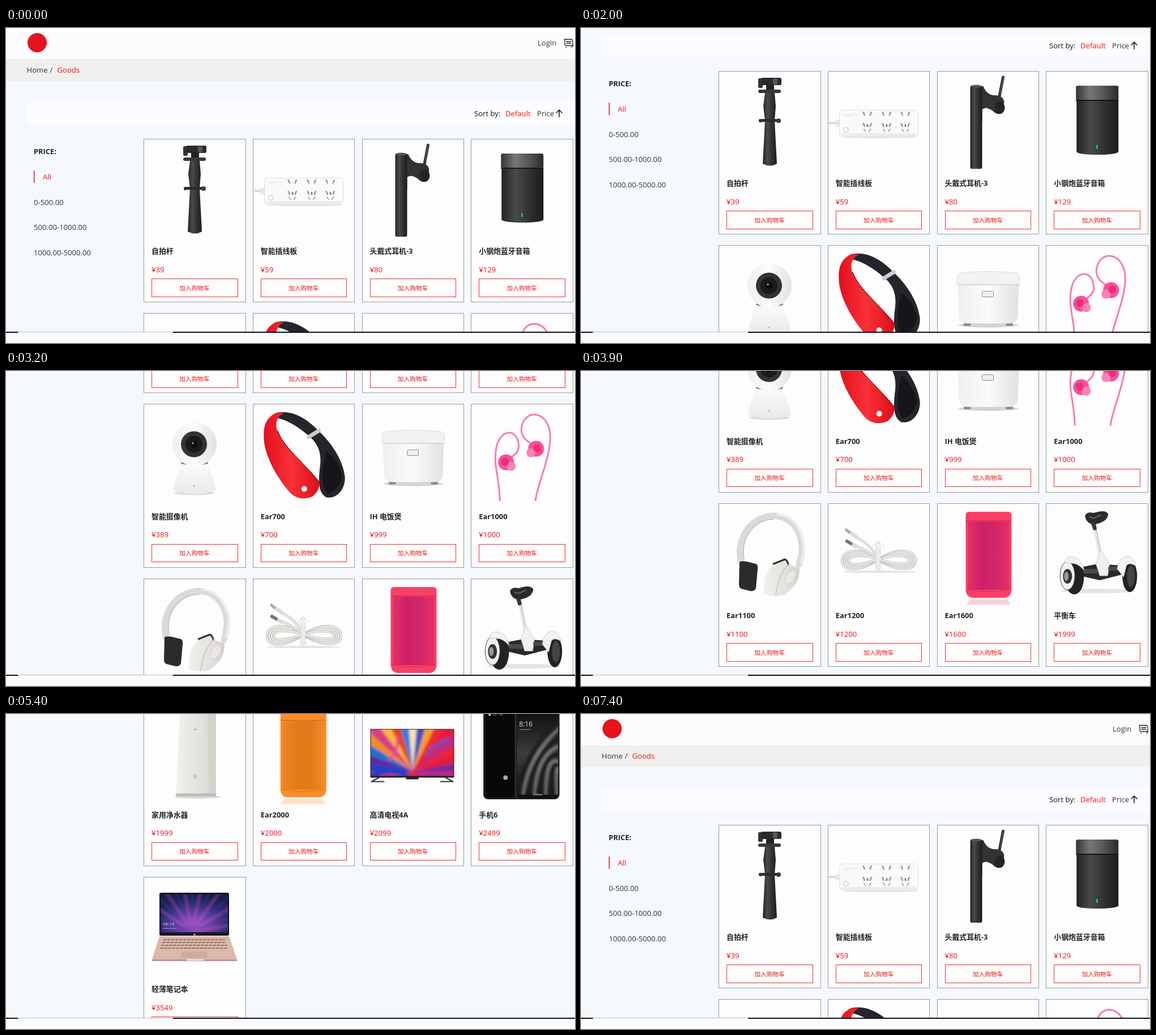
Write an HTML page that moves like this. It is 1005 by 557 pixels and loops after 8000 ms.

```html
<!DOCTYPE html>
<html lang="zh-CN">
<head>
<meta charset="utf-8">
<title>Goods</title>
<style>
html, body { margin: 0; width: 100%; height: 100%; overflow: hidden; background: #fafbfd; }
svg { display: block; width: 100vw; height: 100vh; }
text { font: 13.1px 'Open Sans', 'Noto Sans CJK SC', 'Noto Sans CJK', sans-serif; fill: #333; white-space: pre; }
.bold { font-weight: 700; font-size: 12.9px; fill: #222; }
.red { fill: #ee1414; }
.buy { font-size: 10.7px; fill: #ee1414; text-anchor: middle; }
.box { shape-rendering: crispEdges; }
</style>
</head>
<body>
<svg viewBox="0 0 1005 557" preserveAspectRatio="none">
  <defs id="defs"></defs>
  <rect width="1005" height="538" fill="#f5f9fe"/>
  <g id="page"></g>
  <rect y="537" width="1005" height="20" fill="#fafbfd"/>
  <rect y="537" width="1005" height="2" fill="#111"/>
  <rect x="21" y="537" width="274" height="2" fill="#fafbfd"/>
  <rect x="21" y="537" width="274" height="1" fill="#bbb"/>
</svg>
<script>
const rect = (x, y, w, h, fill, extra = '') =>
  `<rect x="${x}" y="${y}" width="${w}" height="${h}" fill="${fill}" ${extra}/>`;
const oval = (x, y, rx, ry, fill, extra = '') =>
  `<ellipse cx="${x}" cy="${y}" rx="${rx}" ry="${ry}" fill="${fill}" ${extra}/>`;
const disc = (x, y, r, fill, extra) => oval(x, y, r, r, fill, extra);
const shape = (d, fill, extra = '') => `<path d="${d}" fill="${fill}" ${extra}/>`;
const line = (d, color, width = 1, extra = '') =>
  `<path d="${d}" fill="none" stroke="${color}" stroke-width="${width}" stroke-linecap="round" stroke-linejoin="round" ${extra}/>`;
const text = (x, y, s, cls = '', extra = '') => `<text x="${x}" y="${y}" class="${cls}" ${extra}>${s}</text>`;
const stops = colors => colors.map((c, i) => `<stop offset="${i / (colors.length - 1)}" stop-color="${c}"/>`).join('');
const gradient = (id, colors, vertical) =>
  `<linearGradient id="${id}" x2="${vertical ? 0 : 1}" y2="${vertical ? 1 : 0}">${stops(colors)}</linearGradient>`;
const clip = (id, ...box) => `<clipPath id="${id}">${rect(...box)}</clipPath>`;

document.getElementById('defs').innerHTML =
  gradient('dark', ['#222', '#4a4a49', '#303030', '#1d1d1d']) +
  gradient('cap', ['#353535', '#777', '#555', '#2a2a2a']) +
  gradient('white', ['#f0efed', '#fbfbfa', '#e2e1df']) +
  gradient('beige', ['#f3f1ef', '#eae8e5', '#e2e0dc', '#d3d1cd']) +
  gradient('shade', ['#fcfcfc', '#e9e8e5'], true) +
  gradient('scarlet', ['#e3101e', '#fa3038', '#d90f1c']) +
  gradient('pink', ['#f8326a', '#dc2272', '#e02a72', '#f8326a']) +
  gradient('orange', ['#ff8f25', '#f4831c', '#f28218', '#ff9530']) +
  gradient('screen', ['#101010', '#3c3c3c', '#141414'], true) +
  `<radialGradient id="night" cx=".5" cy=".75" r=".75">${stops(['#b45cc0', '#6a3fa5', '#2b2a70', '#141a45'])}</radialGradient>` +
  clip('tv', 16, 48, 146, 82) + clip('phone', 81, 17, 73, 146) + clip('laptop', 30, 31, 119, 67) +
  '<filter id="soft"><feGaussianBlur stdDeviation="2"/></filter>' +
  '<pattern id="mesh" width="3" height="3" patternUnits="userSpaceOnUse"><circle cx="1.5" cy="1.5" r="1" fill="#000" opacity=".2"/></pattern>';

const selfieStick = () =>
  rect(70, 13, 8, 17, '#333', 'rx="2"') + rect(75, 12, 36, 13, '#2b2b2b', 'rx="3"') +
  rect(96, 13, 8, 11, '#555', 'rx="2"') + rect(84, 24, 14, 18, '#242424') +
  rect(70, 33, 40, 6, '#383838', 'rx="3"') +
  shape('M82 39H99L101 62L99 88L103 164Q91 171 78 164L82 88L79 62Z', 'url(#dark)') +
  rect(71, 85, 38, 5, '#2c2c2c', 'rx="2"') + disc(106, 88, 4, '#3c3c3c') + disc(74, 88, 3, '#333');

const socket = (x, y) => line(`M${x - 7} ${y - 2}l2 5M${x + 7} ${y - 2}l-2 5`, '#999', 2.6);
const powerStrip = () => {
  let out = line('M0 92H22', '#d9d9d7', 4) + rect(14, 87, 9, 11, '#e6e6e4') +
    oval(92, 117, 66, 2, '#e5e5e3') +
    rect(21, 69, 139, 47, '#fafafa', 'rx="6" stroke="#dededc"') +
    rect(24, 110, 133, 5, '#ececea', 'rx="3"') + disc(32, 104, 4.5, 'none', 'stroke="#bbb"') +
    line('M28 76H54M28 79H42', '#e2e2e2');
  for (const x of [70, 104, 137])
    out += socket(x, 75) + socket(x, 95) + rect(x - 1, 94, 2.5, 5, '#777') +
      line(`M${x - 6} 103l3 4M${x + 6} 103l-3 4`, '#aaa', 2);
  return out;
};

const headset = () =>
  line('M117 11L108 58', '#333', 5) + line('M117 12L112 40', '#666', 1) +
  shape('M62 27H82Q88 42 101 43Q116 42 119 54L116 74Q108 80 98 70Q86 62 80 68V90H62Z', '#333') +
  oval(111, 65, 9, 11, '#242424') + rect(59, 26, 21, 147, 'url(#dark)', 'rx="3"') +
  oval(69.5, 27, 10, 2.5, '#555');

const canSpeaker = () =>
  shape('M54 53H128V143Q124 148 91 148Q58 148 54 143Z', 'url(#dark)') +
  rect(53, 26, 75, 26, 'url(#cap)', 'rx="3"') + rect(53, 51, 75, 2, '#151515') +
  rect(89, 131, 2.5, 7, '#18bfe0');

const camera = () =>
  oval(90, 157, 36, 4, '#dcdcda') + shape('M68 103H112Q123 127 128 152Q90 166 52 152Q57 127 68 103Z', 'url(#shade)') +
  oval(90, 104, 24, 4, '#666') + disc(90, 71, 39, 'url(#white)') + disc(89, 71, 23, '#333') +
  disc(89, 71, 15, '#1b1b1b') + disc(89, 71, 6, '#090909') + disc(87, 69, 2, '#888') + disc(89, 145, 1.3, '#5bc0ee');

const redHeadphones = () =>
  shape('M44 15C75 10 100 30 119 50C140 70 160 100 163 130C163 150 150 168 130 165C117 158 115 140 119 110C122 85 115 70 100 57C80 40 60 27 40 24Z', '#25262b') +
  shape('M130 83Q152 100 158 128Q154 150 132 159Q121 145 124 112Z', '#15161a') +
  shape('M42 15C22 25 18 40 20 66C24 95 40 125 62 152C74 168 90 170 106 163C116 155 119 145 117 138C95 110 55 80 44 50C38 32 44 20 56 16Z', 'url(#scarlet)') +
  line('M44 48C56 80 95 108 117 138', '#a60c16', 2) + line('M99 58L117 47', '#ccc', 7) + disc(91, 150, 5, '#fff');

const riceCooker = () =>
  oval(91, 141, 53, 4, '#d5d3d0') + rect(48, 135, 12, 7, '#888') + rect(122, 135, 12, 7, '#888') +
  shape('M37 65H145L143 126Q141 138 128 138H54Q41 138 39 126Z', 'url(#white)') +
  shape('M36 69V57Q36 48 48 48Q91 44 134 48Q146 48 146 57V69Z', '#f3f2f1', 'stroke="#dddcda"') +
  rect(37, 69, 108, 1, '#c9c8c5') + rect(80, 81, 20, 10, '#eee', 'rx="2" stroke="#888"');

const bud = (x, y) =>
  disc(x, y, 14, '#f94f98') + disc(x + 9, y + 7, 8, '#f983b4') + disc(x - 2, y - 1, 7, '#e92f82');
const pinkEarphones = () =>
  line('M51 170C50 130 40 110 44 82C48 45 80 40 84 70C87 82 78 90 66 98', '#f87cae', 3) +
  line('M114 170C118 140 138 100 140 62C142 10 92 5 89 45C89 60 100 66 112 74', '#f87cae', 3) +
  bud(62, 103) + `<g transform="translate(228)scale(-1 1)">${bud(113, 79)}</g>`;

const whiteHeadphones = () =>
  line('M40 106C28 62 58 23 97 22C138 24 156 64 142 108', '#dcd9d6', 11) +
  line('M45 98C38 62 62 29 97 28', '#c8c4c0', 2) + line('M104 19C140 24 158 62 146 104', '#efedeb', 4) +
  shape('M37 104Q40 101 50 103L66 107Q70 109 69 116L66 150Q64 156 56 155L40 151Q36 149 36 143Z', '#2b2b2b') +
  shape('M79 157Q80 122 96 109L117 99Q124 101 126 109L143 114Q144 132 134 146L118 161Q108 166 90 163Q80 162 79 157Z', 'url(#beige)') +
  line('M97 107L117 99Q122 101 123 108', '#333', 3) +
  line('M123 108Q106 126 101 162', '#c4c0bc', 1.5) + oval(127, 130, 8, 14, '#e9e6e3', 'transform="rotate(30 127 130)" stroke="#cfccc8"');

const cable = () => {
  let out = oval(90, 121, 66, 2, '#e3e2e0');
  for (let i = 0; i < 4; i++) {
    const d = i * 4;
    const path = `M88 99C60 ${76 + d} ${25 + d} ${82 + d} ${25 + d} 101C${25 + d} ${124 - d} 60 ${120 - d} 90 99C122 ${76 + d} ${156 - d} ${82 + d} ${156 - d} 101C${156 - d} ${122 - d} 120 ${120 - d} 88 99`;
    out += line(path, '#b9b6b2', 4) + line(path, '#efedea', 2.4);
  }
  const leads = 'M50 60Q72 70 86 92M50 76Q70 82 84 95';
  return out + line(leads, '#b9b6b2', 4) + line(leads, '#efedea', 2.4) +
    line('M40 52L51 60', '#dedcd8', 7) + line('M33 47L38 51', '#aaa', 5) +
    line('M44 73L50 76', '#dedcd8', 7) + line('M34 67L41 71', '#777', 6) +
    rect(85, 68, 8, 50, '#ececea', 'rx="3" stroke="#d5d5d3"') + rect(78, 73, 22, 5, '#f2f2f0');
};

const tallSpeaker = (fill, top, x, y) =>
  `<g transform="translate(${x} ${y})">` + shape('M8 155H73L80 164H0Z', top, 'opacity=".25"') +
  shape('M0 6Q0 0 6 0H75Q81 0 81 6V138Q80 152 67 152H14Q1 152 0 138Z', top) +
  rect(4, 17, 73, 121, `url(#${fill})`) + rect(4, 17, 73, 121, 'url(#mesh)') +
  rect(0, 15, 81, 1.5, '#0003') + line('M3 138Q40 144 78 138', '#0002', 1.5) + '</g>';

const scooter = () =>
  oval(92, 155, 65, 4, '#e5e4e2') +
  shape('M69 22Q72 14 84 17L92 15Q106 12 110 19Q109 30 95 35L84 38Q70 34 69 22Z', '#2b2b2b') +
  line('M77 24Q85 28 89 24L97 21', '#666', 2) +
  line('M86 40L97 98', '#e6e4e2', 6) + line('M88 42L99 98', '#b5b3b0', 1) + line('M84 37L86 44', '#333', 7) +
  shape('M56 114L92 107L134 110V126L95 136L60 128Z', '#292929') +
  shape('M88 106L97 82L112 108L109 128H95Z', '#f0f0ef', 'stroke="#ccc"') +
  rect(66, 116, 26, 8, '#4a4a4a', 'rx="2"') + rect(110, 112, 22, 7, '#4a4a4a', 'rx="2"') +
  oval(50, 131, 17, 30, '#222') + oval(38, 128, 13, 25, '#f1f1f0', 'stroke="#444"') +
  oval(38, 129, 8, 13, '#333') + oval(36, 129, 4, 8, '#999') +
  shape('M32 104Q37 91 50 95Q65 100 67 118Q56 105 45 106Z', '#f2f2f1', 'stroke="#ccc"') +
  oval(148, 129, 13, 28, '#222') + oval(150, 129, 7, 19, '#444') +
  shape('M126 116Q128 94 145 93Q156 96 159 111Q148 103 142 110L137 130Z', '#f2f2f1', 'stroke="#ccc"');

const purifier = () =>
  oval(95, 167, 40, 3, '#d8d7d5') + shape('M64 20Q65 16 70 16H124Q128 16 128 21V166H57Z', 'url(#beige)') +
  shape('M113 16H124Q128 16 128 21V165H116Z', '#d6d3cf') + shape('M57 161H128V166H57Z', '#bdbbb8') +
  disc(91, 48, 1.5, '#37b3ee') + disc(91, 131, 4, '#ccc');

const television = () => {
  const colors = ['#2a3bc0', '#5a2fa0', '#1f6fd8', '#f08a28', '#d83a8c', '#f6b53a', '#e8402c', '#2f7fe0',
    '#f7e2b0', '#3c50c8', '#f3a12c', '#ee2a30', '#e81f3c', '#c02a80', '#ef2330', '#e01c40', '#7a2c98'];
  const step = Math.PI / colors.length;
  const rim = i => `${90 - 130 * Math.cos(i * step)} ${122 - 130 * Math.sin(i * step)}`;
  let art = rect(15, 47, 148, 86, '#d92549');
  colors.forEach((color, i) => art += shape(`M90 122L${rim(i)}L${rim(i + 1)}Z`, color));
  art += line('M20 130Q50 112 76 128', '#2440c8', 12) + line('M100 124L155 128', '#b02a90', 9) +
    line('M50 100Q66 86 62 62', '#f04a98', 5) + line('M115 92Q130 72 152 66', '#3a4fd0', 5);
  return rect(15, 47, 148, 86, '#222') + `<g clip-path="url(#tv)"><g filter="url(#soft)">${art}</g></g>` +
    rect(78, 132, 22, 4, '#222') + line('M30 133L17 140H39M148 133L161 140H139', '#333', 2);
};

const phone = () => {
  let curves = '';
  for (let i = 0; i < 8; i++)
    curves += line(`M${82 + i * 10} 166Q${92 + i * 8} ${94 - i * 2} ${162} ${24 + i * 17}`, i % 2 ? '#8a8a8a' : '#1c1c1c', i % 2 ? 4 : 8);
  return rect(22, 11, 80, 160, '#151515', 'rx="8" stroke="#555"') + rect(26, 13, 50, 155, '#080808', 'rx="6"') +
    rect(31, 15, 4, 9, '#ccc', 'rx="2"') + disc(42, 20, 4, '#333') + disc(53, 20, 4, '#333') + disc(61, 133, 4, '#aaa') +
    rect(79, 11, 77, 160, '#111', 'rx="8" stroke="#555"') + rect(81, 18, 73, 146, 'url(#screen)') +
    `<g clip-path="url(#phone)"><g filter="url(#soft)">${curves}</g></g>` +
    text(85, 42, '8:16', '', 'style="font-size:12px;fill:#ddd"') + line('M86 48H104M136 18H151', '#999') +
    line('M111 163H125', '#666', 3);
};

const laptop = () => {
  let glow = rect(28, 28, 123, 74, 'url(#night)');
  for (let i = 0; i < 14; i++) {
    const angle = .15 + i * .2;
    glow += line(`M85 96L${85 + 110 * Math.cos(angle)} ${96 - 110 * Math.sin(angle)}`, i % 2 ? '#3040a8' : '#d060c8', 4, 'opacity=".4"');
  }
  let keys = '';
  for (let i = 0; i < 4; i++)
    keys += line(`M${36 - i * 2} ${111 + i * 5}H${143 + i * 2}`, '#8f7268', 2, 'stroke-dasharray="4 3"');
  return rect(28, 28, 123, 76, '#181722', 'rx="3"') +
    `<g clip-path="url(#laptop)"><g filter="url(#soft)">${glow}</g></g>` +
    disc(90, 102, 2, '#999') + shape('M28 105H151L165 146H15Z', '#dbb8a9') + keys +
    shape('M68 132H111L114 143H66Z', '#d0aa9c') + rect(15, 146, 150, 3, '#bd968a', 'rx="1"') + rect(76, 146, 30, 2, '#eee') +
    text(34, 86, '08:16', '', 'style="font-size:8px;fill:#dde"') + line('M34 91H58', '#aac');
};

const goods = [
  ['自拍杆', 39, selfieStick()], ['智能插线板', 59, powerStrip()],
  ['头戴式耳机-3', 80, headset()], ['小钢炮蓝牙音箱', 129, canSpeaker()],
  ['智能摄像机', 389, camera()], ['Ear700', 700, redHeadphones()],
  ['IH 电饭煲', 999, riceCooker()], ['Ear1000', 1000, pinkEarphones()],
  ['Ear1100', 1100, whiteHeadphones()], ['Ear1200', 1200, cable()],
  ['Ear1600', 1600, tallSpeaker('pink', '#fb4068', 51, 15)], ['平衡车', 1999, scooter()],
  ['家用净水器', 1999, purifier()], ['Ear2000', 2000, tallSpeaker('orange', '#ff8c28', 49, 16)],
  ['高清电视4A', 2099, television()], ['手机6', 2499, phone()],
  ['轻薄笔记本', 3549, laptop()]
];

const card = ([name, price, picture], i) =>
  `<g transform="translate(${243 + i % 4 * 192.75} ${196 + Math.floor(i / 4) * 308.5})">` +
  rect(.5, .3, 179.5, 288.5, '#fdfdfe', 'class="box" stroke="#999"') + picture +
  text(14, 203, name, 'bold') + text(14, 235.5, `¥${price}`, 'red') +
  rect(14.5, 247.7, 151.5, 31.5, 'none', 'class="box" stroke="#ee3030"') +
  text(90, 267.6, '加入购物车', 'buy') + '</g>';

const page = document.getElementById('page');
page.innerHTML =
  rect(0, 0, 1005, 55, '#fcfcfe') + rect(0, 55, 1005, 38.5, '#f0efed') + rect(36, 132, 969, 39.5, '#fcfcfe') +
  disc(55, 26, 17, '#e8121c') + text(939, 31, 'Login') +
  line('M986 20H998Q1001 20 1001 24V28Q1001 31 998 31H989Q987 31 987 28V21M990 24H998M990 27H998M989 34H990M999 34L1002 31', '#222', 1.3) +
  text(36.5, 79, 'Home') + text(77.5, 79, '/') + text(90.5, 79, 'Goods', 'red') +
  text(827, 155.7, 'Sort by:', '', 'style="fill:#111"') + text(882, 155.7, 'Default', 'red') + text(938, 155.7, 'Price') +
  line('M977 157V145M972 150L977 145L982 150', '#111', 1.5) +
  text(49, 222.7, 'PRICE:', 'bold') + rect(49, 252, 1.5, 22, '#ee1414') + text(65, 267.5, 'All', 'red') +
  ['0-500.00', '500.00-1000.00', '1000.00-5000.00'].map((s, i) => text(49, 312.5 + i * 44.7, s)).join('') +
  goods.map(card).join('') + rect(0, 1739, 1005, 110, '#f3f3ef');

// Wheel bursts: start time, then the scroll offset at each 100 ms step.
const bursts = [
  [0, 0], [1300, 2.5, 45, 88, 100], [2000, 120, 172, 200], [2500, 206, 250, 304, 324],
  [3000, 342, 414, 446], [3500, 460, 536, 568], [3900, 579, 650, 681],
  [4300, 692, 741, 782, 795.5], [4800, 806, 855, 896, 909], [5300, 1000, 1142, 1250, 1297],
  [5900, 1301], [6700, 560], [7000, 300, 210], [7400, 0]
];

function scrollAt(time) {
  const [start, ...steps] = bursts.findLast(b => b[0] <= time);
  return steps[Math.min(steps.length - 1, Math.floor((time - start) / 100))];
}

function draw(now) {
  page.setAttribute('transform', `translate(0 ${-scrollAt(now % 8000)})`);
  requestAnimationFrame(draw);
}
draw(0);
</script>
</body>
</html>
```
